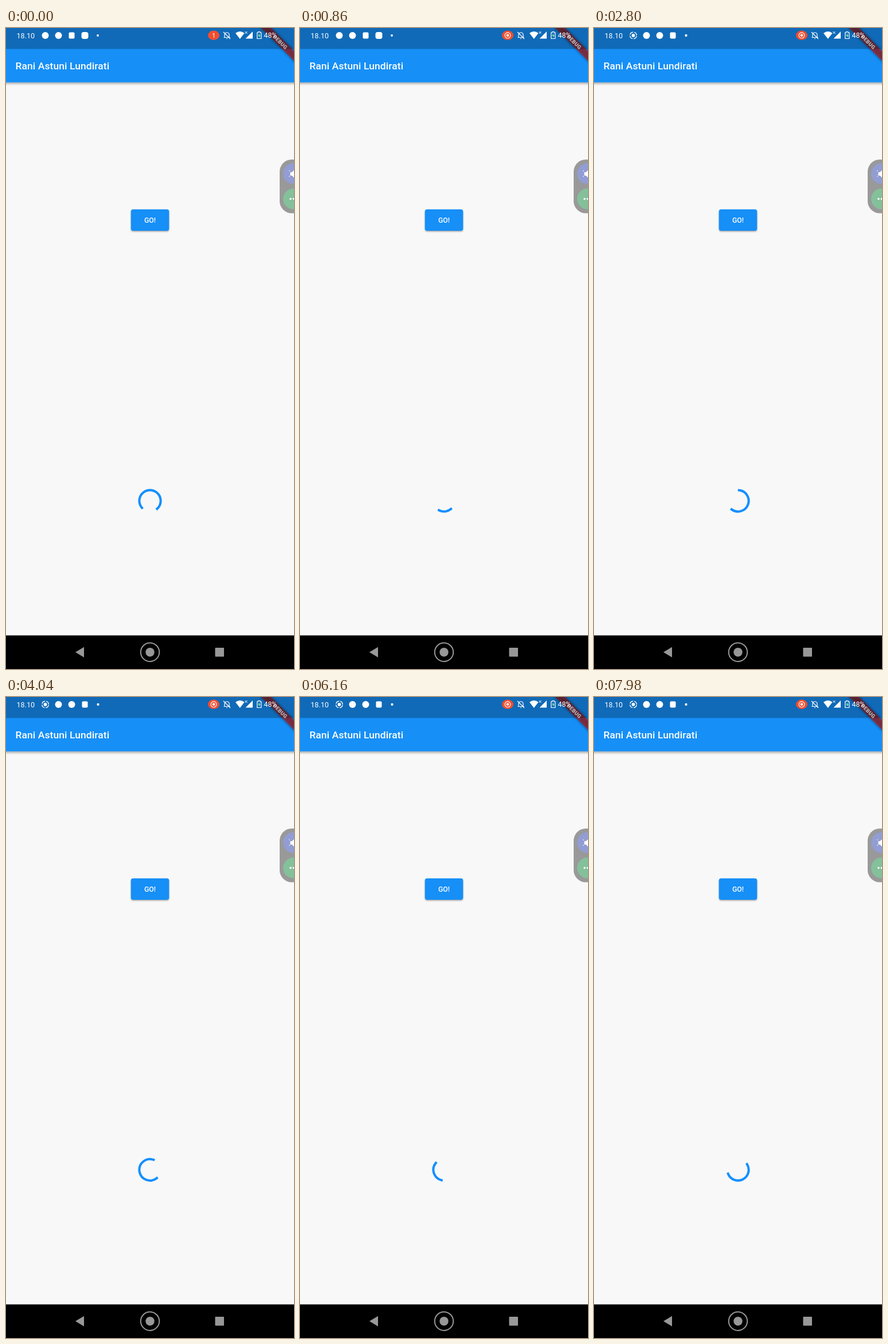
An HTML page that plays this animation: 502x1116 px, repeating every 8000 ms.

```html
<!DOCTYPE html>
<html lang="id">
<head>
<meta charset="utf-8">
<title>Loading</title>
<style>
  html, body { margin: 0; width: 100%; height: 100%; overflow: hidden; background: #f8f8f8; }
  svg { display: block; width: 502px; height: 1116px; }
  text { font-family: Roboto, sans-serif; fill: #fff; }
</style>
</head>
<body>
<svg viewBox="0 0 502 1116">
  <defs>
    <filter id="barShadow" x="-5%" y="-20%" width="110%" height="160%">
      <feDropShadow dx="0" dy="2" stdDeviation="2" flood-opacity=".4"/>
    </filter>
    <filter id="buttonShadow" x="-20%" y="-30%" width="140%" height="170%">
      <feDropShadow dx="0" dy="1.5" stdDeviation="1.2" flood-opacity=".35"/>
    </filter>
    <filter id="soft" x="-20%" y="-100%" width="140%" height="300%">
      <feGaussianBlur stdDeviation="2.5"/>
    </filter>
  </defs>

  <rect width="502" height="1116" fill="#f8f8f8"/>
  <rect x="-8" y="-8" width="518" height="102.5" fill="#158ff7" filter="url(#barShadow)"/>
  <text x="16.5" y="72" font-size="17.4" font-weight="500" letter-spacing=".1">Rani Astuni Lundirati</text>

  <rect x="217.700" y="315.800" width="66.600" height="37.200" rx="4" fill="#158ff7" filter="url(#buttonShadow)"/>
  <text x="251" y="339" font-size="12.3" font-weight="500" text-anchor="middle">GO!</text>

  <path id="spinner" fill="none" stroke="#148fff" stroke-width="4.1" stroke-linecap="square"/>

  <g transform="translate(478 24.500) rotate(45)">
    <rect x="-60" y="-6.200" width="120" height="12.400" fill-opacity=".5" filter="url(#soft)"/>
    <rect x="-60" y="-6.200" width="120" height="12.400" fill="#b71c1c" fill-opacity=".63"/>
    <text y="3.300" font-size="9.200" font-weight="900" text-anchor="middle" letter-spacing=".3">DEBUG</text>
  </g>

  <!-- floating recorder handle -->
  <rect x="477" y="229" width="60" height="93.5" rx="21" fill="#999"/>
  <circle cx="501" cy="253.5" r="18" fill="#929dd3"/>
  <circle cx="501" cy="297.5" r="18" fill="#84c09a"/>
  <path d="M496 251.5h2.500l4-4v13l-4-4h-2.500zM493 248l2 1.500M493 259l2-1.500" fill="#fff" stroke="#fff"/>
  <g fill="#fff"><circle cx="496" cy="297.500" r="1.800"/><circle cx="501.500" cy="297.500" r="1.800"/></g>

  <!-- status bar, a dark veil over the app -->
  <rect width="502" height="36.5" fill-opacity=".26"/>
  <text x="18.500" y="17.600" font-size="12.600">18.10</text>
  <g fill="#fff">
    <g id="recorder" transform="translate(68.500 13)">
      <circle r="5.800" fill="none" stroke="#fff" stroke-width="1.400" stroke-dasharray="7.110 2" stroke-dashoffset="-1"/>
      <circle r="2.900"/>
    </g>
    <g id="shifting">
      <circle cx="68.500" cy="13" r="6"/>
      <circle cx="91.500" cy="13" r="6"/>
      <rect x="109.500" y="7.500" width="10" height="11" rx="2"/>
      <rect id="collapsing" x="-6" y="-6" width="12" height="12" rx="4"/>
    </g>
    <circle id="more" cx="160" cy="13" r="1.900"/>
  </g>

  <ellipse cx="362" cy="12.800" rx="10" ry="8.200" fill="#f04e30"/>
  <text id="count" x="362" y="16.800" font-size="11" text-anchor="middle">1</text>
  <g id="recording" fill="#fff" transform="translate(362 12.800)">
    <circle r="4.900" fill="none" stroke="#fff" stroke-width="1.100"/>
    <circle r="2.300"/>
  </g>
  <path d="M379.500 16.500h11M381 16v-4q0-4 4-4t4 4v4M379 7l12 12M384 18.500h2" fill="none" stroke="#fff" stroke-width="1.200"/>
  <path d="M400 9q8-6 15.500 0l-7.700 10zM417.500 18.500h12.500v-12.500z" fill="#fff"/>
  <path d="M416.500 6l4 4m0-4l-4 4" stroke="#fff"/>
  <path d="M437.800 8h2v-1.500h3v1.500h2v10.500h-7z" fill="none" stroke="#fff" stroke-width="1.200"/>
  <path d="M441.800 9.500l-2.600 4h1.800v3.300l2.600-4.300h-1.800z" fill="#8df0a8"/>
  <text x="449.500" y="17.300" font-size="12.300">48%</text>

  <!-- navigation bar -->
  <rect y="1057.500" width="502" height="58.500"/>
  <g fill="#989898">
    <path d="M121 1086.700l15-9v18z"/>
    <circle cx="251" cy="1086.700" r="16.200" fill="none" stroke="#989898" stroke-width="2"/>
    <circle cx="251" cy="1086.700" r="7.700"/>
    <rect x="364.500" y="1079" width="15.500" height="15.500" rx="1"/>
  </g>
</svg>
<script>
const LOOP = 8000;
const CENTER = { x: 251, y: 823.2, r: 18.6 };

// Bursts of screen updates: first ms, last ms, number of updates.
const bursts = [
  [0, 0, 1], [120, 160, 2], [300, 860, 9], [960, 1100, 3], [1140, 1700, 10],
  [1820, 1940, 3], [1980, 2680, 13], [2800, 3520, 13], [3620, 4040, 8],
  [5160, 5460, 6], [5600, 6160, 11], [6280, 6320, 2], [6440, 7140, 12], [7260, 7980, 12]
];
const updates = bursts.flatMap(([from, to, count]) =>
  Array.from({ length: count }, (_, i) =>
    count === 1 ? from : Math.round((from + (to - from) * i / (count - 1)) / 20) * 20));

const clamp = v => Math.min(1, Math.max(0, v));
const byId = id => document.getElementById(id);
const show = (id, opacity) => byId(id).setAttribute('opacity', opacity);

// cubic-bezier(.4, 0, .2, 1)
function ease(x) {
  x = clamp(x);
  let low = 0, high = 1;
  for (let i = 0; i < 24; i++) {
    const s = (low + high) / 2, q = 1 - s;
    if (1.2 * q * q * s + 0.6 * q * s * s + s ** 3 < x) low = s; else high = s;
  }
  return low * low * (3 - 2 * low);
}

function pointAt(degrees) {
  const a = degrees * Math.PI / 180;
  return `${(CENTER.x + CENTER.r * Math.sin(a)).toFixed(3)} ${(CENTER.y - CENTER.r * Math.cos(a)).toFixed(3)}`;
}

function drawSpinner(t) {
  const cycles = 0.495 + t * 0.000268;
  const phase = cycles % 1;
  const head = ease(phase * 2) * 270;
  const tail = ease(phase * 2 - 1) * 270;
  const sweep = Math.max(head - tail, 0.2);
  const start = tail + phase * 90 + 180 + (cycles - 0.5) * 216;
  byId('spinner').setAttribute('d',
    `M${pointAt(start)}A${CENTER.r} ${CENTER.r} 0 ${sweep > 180 ? 1 : 0} 1 ${pointAt(start + sweep)}`);
}

function drawStatus(t) {
  show('count', t < 300 ? 1 : 0);
  show('recording', t < 300 ? 0 : 1);
  const shift = ease((t - 1500) / 820);
  byId('shifting').setAttribute('transform', `translate(${23 * shift} 0)`);
  byId('collapsing').setAttribute('transform',
    `translate(137.5 13) scale(${1 - 0.68 * clamp(shift * 2.5)})`);
  show('recorder', clamp((shift - 0.35) / 0.65));
  show('more', shift > 0 ? 0 : 1);
}

const began = performance.now();
function frame() {
  const now = (performance.now() - began) % LOOP;
  const index = updates.findLastIndex(u => u <= now);
  const t = updates[index];
  const hold = Math.min((updates[index + 1] ?? LOOP) - t, 120);
  drawSpinner(t + hold / 2); // each pose belongs to the middle of its hold
  drawStatus(t);
  requestAnimationFrame(frame);
}
frame();
</script>
</body>
</html>
```
